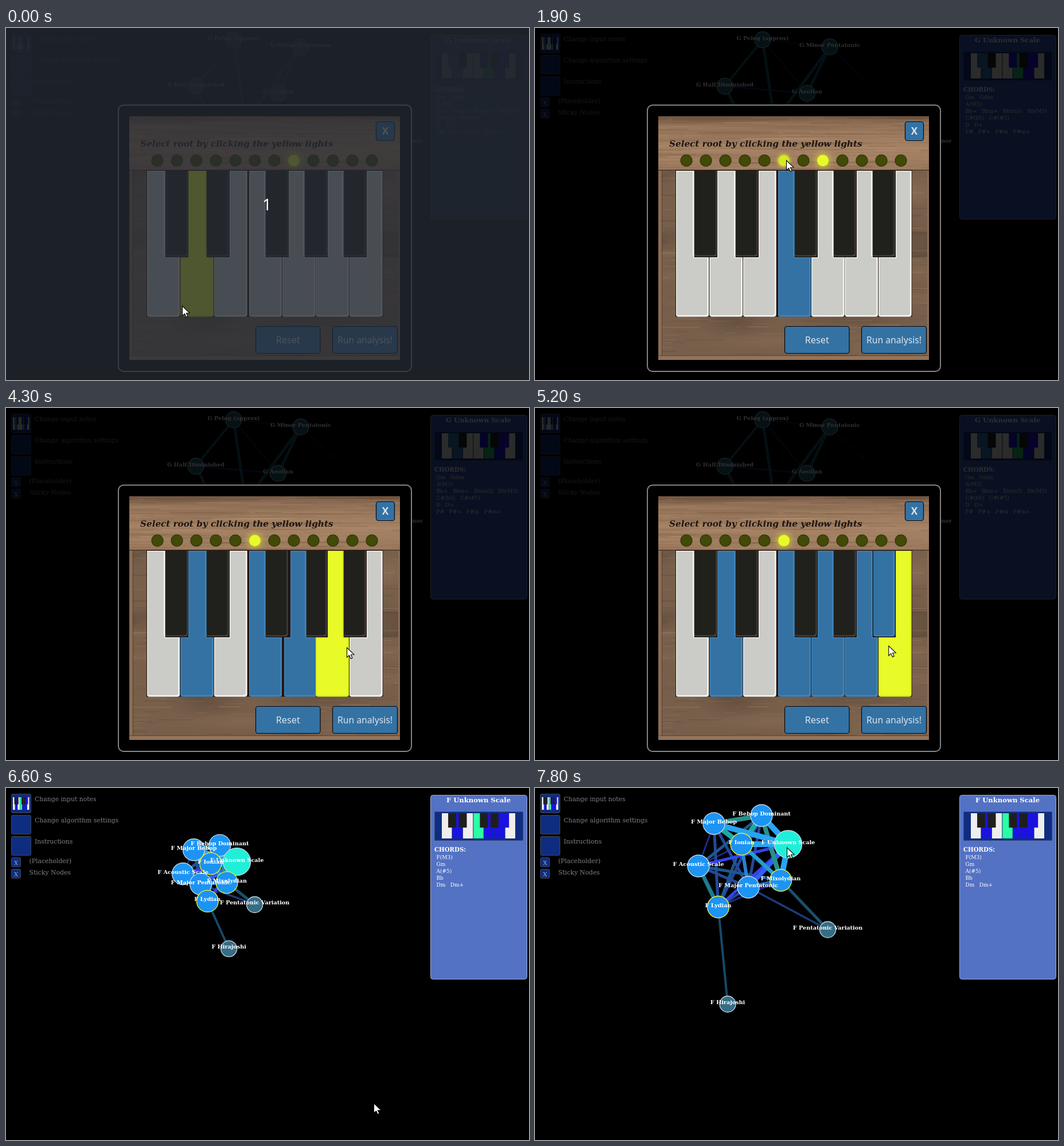
An HTML page with a canvas that plays this animation: 912 px wide and 614 px high, repeating every 8 s.

```html
<!DOCTYPE html>
<html lang="en">
<head>
<meta charset="utf-8">
<title>Scale finder</title>
<style>
html, body { margin: 0; width: 100%; height: 100%; overflow: hidden; background: #000; }
canvas { display: block; }
</style>
</head>
<body>
<canvas id="stage" width="912" height="614"></canvas>
<script>
const canvas = document.getElementById('stage');
const SERIF = '"DejaVu Serif", serif', SANS = '"Noto Sans", sans-serif';
const BLUE = '#3472a4', YELLOW = '#e8fb28', NAVY = '#0f2d80';
let g = canvas.getContext('2d');

// ---------- helpers ----------
function text(s, x, y, font, color, align = 'left') {
  g.font = font;
  g.fillStyle = color;
  g.textAlign = align;
  g.fillText(s, x, y);
}

function rect(x, y, w, h, fill) {
  g.fillStyle = fill;
  g.fillRect(x, y, w, h);
}

function box(x, y, w, h, r, fill, stroke, line = 1) {
  g.beginPath();
  g.roundRect(x, y, w, h, r);
  if (fill) { g.fillStyle = fill; g.fill(); }
  if (stroke) { g.strokeStyle = stroke; g.lineWidth = line; g.stroke(); }
}

function disc(x, y, r, fill, stroke, line = 1.3) {
  g.beginPath();
  g.arc(x, y, r, 0, 7);
  g.fillStyle = fill;
  g.fill();
  if (stroke) { g.strokeStyle = stroke; g.lineWidth = line; g.stroke(); }
}

function line(a, b, color, width) {
  g.beginPath();
  g.moveTo(a[0], a[1]);
  g.lineTo(b[0], b[1]);
  g.strokeStyle = color;
  g.lineWidth = width;
  g.stroke();
}

// Linear track of [time, ...values]
function track(keys, t) {
  if (t <= keys[0][0]) return keys[0].slice(1);
  for (let i = 1; i < keys.length; i++) {
    const a = keys[i - 1], b = keys[i];
    if (t <= b[0]) {
      const p = (t - a[0]) / (b[0] - a[0]);
      return a.slice(1).map((v, j) => v + (b[j + 1] - v) * p);
    }
  }
  return keys[keys.length - 1].slice(1);
}

let seed = 11;
const rnd = () => (seed = (seed * 16807) % 2147483647) / 2147483647;

// ---------- wood background ----------
function grain(x, y, w, h, count, maxLen, alpha) {
  g.save();
  g.beginPath();
  g.rect(x, y, w, h);
  g.clip();
  for (let i = 0; i < count; i++) {
    const len = maxLen * (0.2 + rnd() * 0.8);
    const gx = x + rnd() * (w + len) - len, gy = y + rnd() * h;
    const tone = rnd() < 0.5 ? '60,38,24' : '200,165,135';
    rect(gx, gy, len, 0.8 + rnd() * 1.6, `rgba(${tone},${alpha * rnd()})`);
  }
  g.restore();
}

// Soft elliptical stain
function stain(x, y, rx, ry, tone, alpha) {
  g.save();
  g.translate(x, y);
  g.scale(rx, ry);
  const grad = g.createRadialGradient(0, 0, 0, 0, 0, 1);
  grad.addColorStop(0, `rgba(${tone},${alpha})`);
  grad.addColorStop(1, `rgba(${tone},0)`);
  rect(-1, -1, 2, 2, grad);
  g.restore();
}

function makeWood() {
  const c = document.createElement('canvas'), main = g;
  c.width = 472;
  c.height = 425;
  g = c.getContext('2d');
  rect(0, 0, 472, 425, '#775f4b');
  for (let i = 0; i < 34; i++)
    stain(rnd() * 472, 96 + rnd() * 320, 40 + rnd() * 90, 8 + rnd() * 22, rnd() < 0.5 ? '60,45,34' : '160,128,100', 0.25);
  rect(442, 201, 27, 45, 'rgba(45,32,24,.25)');
  grain(0, 94, 472, 331, 420, 70, 0.16);
  const top = g.createLinearGradient(0, 0, 0, 94);
  top.addColorStop(0, '#7f624c');
  top.addColorStop(0.22, '#96755a');
  top.addColorStop(0.6, '#a58263');
  top.addColorStop(1, '#9a785c');
  rect(0, 0, 472, 94, top);
  for (let i = 0; i < 12; i++)
    stain(rnd() * 472, rnd() * 80, 120, 4 + rnd() * 8, rnd() < 0.5 ? '95,68,48' : '190,155,122', 0.22);
  grain(0, 0, 472, 94, 260, 220, 0.14);
  rect(0, 93, 472, 1.5, 'rgba(40,25,15,.6)');
  rect(0, 95, 6, 330, '#8b6d55');
  rect(6, 95, 1, 324, 'rgba(40,28,20,.5)');
  rect(469, 95, 3, 330, '#8b6d55');
  rect(0, 418, 472, 7, '#93735a');
  rect(0, 417, 472, 1, 'rgba(40,28,20,.4)');
  g = main;
  return c;
}

// ---------- menu and side panel ----------
// colors: map from pitch class to fill
function miniKeys(x, y, w, h, colors) {
  const kw = w / 7;
  [0, 2, 4, 5, 7, 9, 11].forEach((n, i) => rect(x + i * kw, y, kw - Math.min(1, kw * 0.12), h, colors[n] || '#eeeeec'));
  [1, 3, 6, 8, 10].forEach((n, i) => rect(x + kw * ([1, 2, 4, 5, 6][i] - 0.4), y, kw * 0.76, h * 0.57, colors[n] || '#1e1f1d'));
}

const scales = {
  G: {
    panel: '#3358b8',
    keys: { 1: '#2c78b8', 2: '#2c78b8', 6: '#1a12e0', 7: '#20c070', 9: '#1a12e0', 10: '#1a12e0' },
    chords: ['Gm   Gdim', 'A(M3)', 'Bb+   Bbm+   Bb(m3)   Bb(M3)', 'C#(b5)   C#(#5)', 'D   D+', 'F#   F#+   F#m   F#m+']
  },
  F: {
    panel: '#5472c4',
    keys: { 2: '#1c12e0', 5: '#2bffa4', 7: '#1c12e0', 9: '#1c12e0', 10: '#1c12e0' },
    chords: ['F(M3)', 'Gm', 'A(#5)', 'Bb', 'Dm   Dm+']
  }
};

function drawSides(root) {
  const { panel, keys, chords } = scales[root];
  const gray = '#818181', font = '10.85px ' + SERIF;
  [10.5, 47.5, 84.5].forEach((y, i) => {
    box(9.5, y, 34, 33, 2, NAVY, '#454545');
    text(['Change input notes', 'Change algorithm settings', 'Instructions'][i], 50, y + 12.5, font, gray);
  });
  miniKeys(12, 16, 29, 22, keys);
  [121.5, 141.5].forEach((y, i) => {
    box(9.5, y, 16, 16, 2, NAVY, '#454545');
    text('X', 17.5, y + 12, '10px ' + SERIF, '#a5adc4', 'center');
    text(['(Placeholder)', 'Sticky Nodes'][i], 40.5, y + 9, font, gray);
  });

  box(740.5, 12.5, 168, 321, 4, panel, '#9aa8cf');
  text(root + ' Unknown Scale', 824, 24.5, 'bold 11.6px ' + SERIF, '#fff', 'center');
  box(747.5, 41.5, 154, 50, 1, NAVY, '#34497f');
  miniKeys(760, 44, 129, 44, keys);
  text('CHORDS:', 747, 110.5, 'bold 10.2px ' + SERIF, '#fff');
  chords.forEach((c, i) => text(c, 750.5, 124 + i * 12, '9px ' + SERIF, '#fff'));
}

// ---------- graphs ----------
const LABEL = 'bold 9.67px ' + SERIF;

const oldNodes = [
  ['G Pelog (approx)', 397, 20.5], ['G Minor Pentatonic', 514, 33],
  ['G Half Diminished', 331, 101.5], ['G Aeolian', 474.5, 114], ['G Harmonic Minor', 676, 200]
];

function drawOldGraph() {
  const p = oldNodes.map(n => n.slice(1));
  line(p[0], p[1], '#101c50', 2);
  line(p[0], p[3], '#101c50', 2);
  line(p[2], p[3], '#14205c', 3);
  line(p[1], [575, 90], '#0c1640', 2);
  line(p[0], p[2], '#175468', 4);
  line(p[0], [420, 180], '#175468', 5);
  line(p[1], p[3], '#175468', 5);
  line(p[1], [420, 160], '#175468', 5);
  line(p[2], [360, 160], '#175468', 5);
  p.forEach(q => disc(...q, 14, '#1f5c78', '#7fb0b8'));
  oldNodes.forEach(n => text(n[0], n[1], n[2], LABEL, '#fff', 'center'));
}

// name, settled x/y, dragged x/y
const nodes = {
  BD: ['Bebop Dominant', 375, 59, 395, 48],
  MB: ['Major Bebop', 292.5, 73, 312, 62],
  Io: ['Ionian', 346, 117, 360, 98],
  US: ['Unknown Scale', 429.5, 111, 441.5, 98],
  AS: ['Acoustic Scale', 258, 149.5, 285, 136],
  MP: ['Major Pentatonic', 314.5, 182, 372, 173],
  Mx: ['Mixolydian', 397.5, 177, 428.5, 161],
  Ly: ['Lydian', 336, 236.5, 319.5, 207.5],
  PV: ['Pentatonic Variation', 486, 247.5, 510.5, 247],
  Hi: ['Hirajoshi', 404, 387.5, 336, 377]
};

// width, color, pairs
const links = [
  [4, '#17486a', 'Ly-Hi'], [5, '#1c5068', 'Mx-PV'], [3.5, '#1c3d7c', 'MP-PV'],
  [3, '#1d2a88', 'MB-AS Io-AS Mx-Ly'],
  [5, '#22489c', 'MB-MP MB-Ly BD-Ly BD-MP AS-MP MP-Ly'],
  [5, '#1f568f', 'BD-AS AS-Mx Io-Ly'],
  [7, '#1f7a90', 'AS-Ly'], [6, '#2468b8', 'MP-Mx'],
  [5, '#3344f0', 'AS-US Ly-US'], [8, '#315ef5', 'MP-US'],
  [6, '#2a7fd5', 'Io-MP'], [8, '#27908c', 'MB-BD BD-Mx'],
  [9, '#1fa8a8', 'BD-Io MB-Io'], [7, '#229fce', 'Io-Mx'],
  [10, '#28a4f2', 'MB-US BD-US Io-US Mx-US']
];

function drawGraph(t) {
  const [drift] = track([[7100, 0], [7300, 0.35], [7400, 0.35], [7800, 1]], t);
  const open = Math.min(1, (t - 6500) / 600), size = 1 - 0.65 * (1 - open) ** 2;
  const pos = {};
  for (const id in nodes) {
    const [, x0, y0, x1, y1] = nodes[id];
    pos[id] = [370 + (x0 + (x1 - x0) * drift - 370) * size, 150 + (y0 + (y1 - y0) * drift - 150) * size];
  }
  for (const [w, color, pairs] of links)
    for (const pair of pairs.split(' ')) {
      const [a, b] = pair.split('-');
      line(pos[a], pos[b], color, w);
    }
  for (const id in nodes) {
    const small = id === 'PV' || id === 'Hi', main = id === 'US';
    const rim = ['Io', 'Mx', 'Ly'].includes(id) ? '#f0f020' : '#c8d8e6';
    disc(...pos[id], small ? 14 : main ? 24 : 19, small ? '#366c85' : main ? '#1fefd8' : '#1c94f4', rim);
  }
  for (const id in nodes) text('F ' + nodes[id][0], pos[id][0], pos[id][1], LABEL, '#fff', 'center');
}

// ---------- piano dialog ----------
// pitch class, lower left/right, upper left/right
const whites = [
  [0, 246, 303, 246, 277.5], [2, 304.5, 362, 318, 349.5], [4, 363, 420.5, 390, 420.5],
  [5, 424, 481, 424, 452.5], [7, 482, 539.5, 493, 520.5], [9, 540.5, 598, 561, 588.5], [11, 599, 656.5, 629, 656.5]
];
const blacks = [[1, 278], [3, 349.5], [6, 452.5], [8, 520.5], [10, 588.5]];
const TOP = 249, MID = 400, END = 503.5;

function keyPath(l, r, ul, ur) {
  g.beginPath();
  g.moveTo(ul, TOP);
  g.lineTo(ur, TOP);
  g.lineTo(ur, MID);
  g.lineTo(r, MID);
  g.arcTo(r, END, l, END, 4);
  g.arcTo(l, END, l, MID, 4);
  g.lineTo(l, MID);
  g.lineTo(ul, MID);
  g.closePath();
}

function whiteKey(shape, fill, edge, dx) {
  g.save();
  g.translate(dx, 0);
  keyPath(...shape);
  g.clip();
  g.fillStyle = edge;
  g.fill();
  g.translate(-2.5, -2.5);
  keyPath(...shape);
  g.fillStyle = fill;
  g.fill();
  g.translate(2.5, 2.5);
  keyPath(...shape);
  g.strokeStyle = edge;
  g.lineWidth = 2.4;
  g.stroke();
  g.restore();
}

function keyAt(x, y) {
  if (y < TOP || y > END) return -1;
  if (y < MID)
    for (const [n, bx] of blacks) if (x >= bx && x < bx + 40) return n;
  const hit = whites.find(k => x >= k[1] && x <= k[2]);
  return hit ? hit[0] : -1;
}

const presses = { 5: 1200, 2: 3300, 7: 4100, 9: 4400, 10: 5000 };

function keyColors(n, t, hover, base, edge) {
  if (n === hover) return [YELLOW, '#dcef22'];
  return t >= presses[n] ? [BLUE, '#4086bd'] : [base, edge];
}

function keyShift(n, t) {
  if (n === 2 && t >= 3300 && t < 3500) return -2;
  return n === 7 && t >= 4100 && t < 4400 ? 3 : 0;
}

function drawPiano(t, hover) {
  rect(245, 248, 412.5, 255.5, '#25140d');
  for (const [n, x] of blacks) {
    const [fill, edge] = keyColors(n, t, hover, '#20211c', '#454541');
    const inset = fill === BLUE ? 1.5 : 0;
    box(x, TOP, 39.5, 150.5, [0, 0, 3, 3], '#14120f');
    box(x + inset, TOP, 39 - inset, 149.5, [0, 0, 4, 4], edge);
    box(x + inset, TOP, 36 - inset, 147.5, [0, 0, 4, 4], fill);
    if (fill !== BLUE) rect(x + 36, TOP, 1, 146, '#161613');
  }
  for (const [n, ...shape] of whites) {
    const [fill, edge] = keyColors(n, t, hover, '#cbccc7', '#f6f6f2');
    whiteKey(shape, fill, edge, keyShift(n, t));
  }
}

function drawLights(t, [mx, my]) {
  const lit = t < 2000 ? 7 : 5;
  for (let i = 0; i < 12; i++) {
    const x = 264 + 34 * i, y = 231.2, over = Math.hypot(mx - x, my - y) < 11 && t >= 1200;
    const on = i === lit || (i === 5 && over);
    g.save();
    if (on) { g.shadowColor = YELLOW; g.shadowBlur = i === lit ? 14 : 7; }
    disc(x, y, 10, on ? YELLOW : '#414a06', on ? null : '#33350f');
    g.restore();
    if (on && i !== lit) disc(x, y, 9.5, 'rgba(190,200,30,.35)', '#c6d02c');
  }
}

function button(x, y, w, h, label, font, base, hot) {
  g.save();
  if (hot) { g.shadowColor = '#fff'; g.shadowBlur = 5; }
  box(x, y, w, h, 4, hot ? '#ecebe9' : BLUE);
  g.restore();
  box(x, y, w, h, 4, null, '#05080c', 1.2);
  text(label, x + w / 2 + (hot ? 1 : 0), base, font, hot ? '#111' : '#dde5ec', 'center');
}

function drawDialog(t, mouse) {
  const [mx, my] = mouse;
  box(196, 134.5, 511, 464.5, 9, '#000', '#888', 1.9);
  g.drawImage(wood, 215, 154);
  text('Select root by clicking the yellow lights', 234, 207, 'italic bold 15.2px ' + SERIF, '#1c1512');
  button(645.5, 163.5, 32, 33, 'X', 'bold 17px ' + SANS, 186);
  drawLights(t, mouse);
  drawPiano(t, keyAt(mx, my));
  const hot = mx > 569 && mx < 683 && my > 521 && my < 568;
  button(435.5, 520.5, 112.5, 47, 'Reset', '16.3px ' + SANS, 550);
  button(569.5, 520.5, 113, 47, 'Run analysis!', '15.7px ' + SANS, 550, hot);
  if (t >= 5900) {
    g.setLineDash([1, 1]);
    box(577.5, 526.5, 99, 40, 0, null, '#222');
    g.setLineDash([]);
  }
}

// ---------- pointer ----------
const path = [
  [400, 307, 485], [800, 452, 437], [900, 452, 437], [1000, 437, 430], [1200, 437, 430],
  [1800, 437, 238], [1900, 438, 231], [2100, 438, 231], [2900, 366, 400], [3100, 334, 445],
  [3400, 334, 445], [4000, 512, 432], [4100, 518, 430], [4300, 594, 418], [4400, 592, 415],
  [4800, 608, 370], [5000, 608, 370], [5800, 641, 550], [6600, 641, 550],
  [7100, 548, 415], [7300, 431, 113], [7400, 431, 113], [7800, 439, 104]
];

function drawPointer([x, y]) {
  g.save();
  g.translate(x, y);
  g.beginPath();
  [[0.5, 0], [0.5, 17], [4.5, 13.3], [7.2, 19.3], [10, 18], [7.3, 12.2], [13, 12]].forEach(p => g.lineTo(...p));
  g.closePath();
  g.fillStyle = '#fff';
  g.fill();
  g.strokeStyle = '#000';
  g.lineWidth = 1.1;
  g.stroke();
  g.restore();
}

// ---------- main ----------
const wood = makeWood();

function draw(t) {
  const mouse = track(path, t);
  rect(0, 0, 912, 614, '#000');
  if (t < 6600) {
    drawOldGraph();
    drawSides('G');
    rect(0, 0, 912, 614, 'rgba(0,0,0,.82)');
    drawDialog(t, mouse);
  } else {
    drawGraph(t);
    drawSides('F');
  }
  if (t < 100) {
    rect(0, 0, 912, 614, 'rgba(36,41,50,.78)');
    text('1', 455, 318, '28px ' + SANS, '#fff', 'center');
  }
  drawPointer(mouse);
}

function frame() {
  const t = performance.now() % 8000;
  draw(Math.floor(t / 100) * 100);
  requestAnimationFrame(frame);
}
frame();
</script>
</body>
</html>
```
